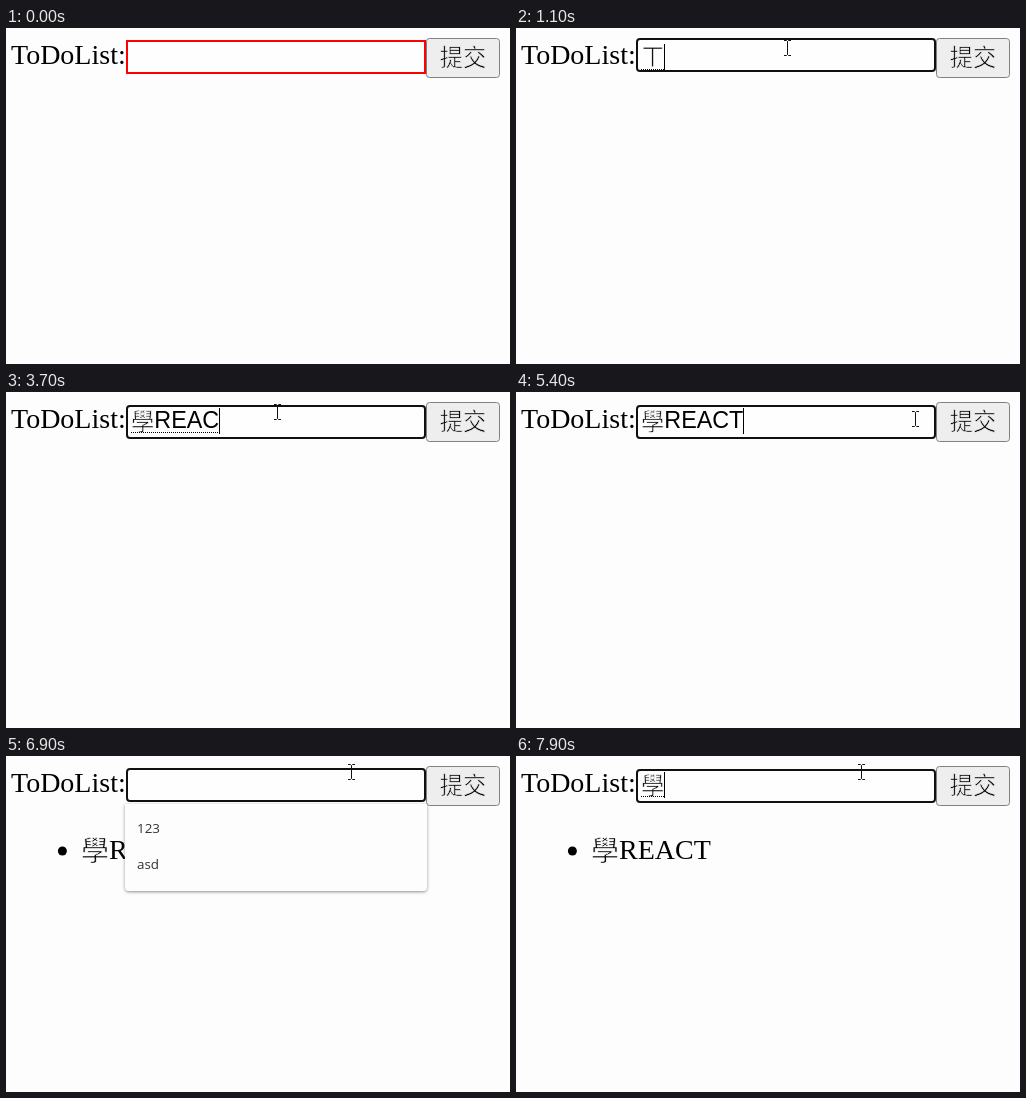
Recreate the animation shown at these times as an HTML page. Size 504x336 px, loop 8000 ms.

```html
<!DOCTYPE html>
<html lang="zh-Hant">
<head>
<meta charset="utf-8">
<title>ToDoList</title>
<style>
html, body { margin: 0; width: 100%; height: 100%; overflow: hidden; background: #fdfdfd; }
svg { display: block; }
text { fill: #000; white-space: pre; }
.page { font: 28px "Liberation Serif", "Times New Roman", serif; }
.form { font: 23.333px "Liberation Sans", Arial, sans-serif; }
/* a stroke in the ground colour thins the glyphs */
.han { font-family: "Noto Sans CJK TC", "Noto Sans CJK", sans-serif; font-weight: 300; stroke: #fdfdfd; stroke-width: .7; }
.hint { font: 13.4px "Open Sans", sans-serif; fill: #333; }
</style>
</head>
<body>
<svg width="504" height="336" viewBox="0 0 504 336">
  <defs>
    <filter id="shade" x="-5%" y="-10%" width="110%" height="125%">
      <feDropShadow dx="0" dy="1" stdDeviation="1.5" flood-color="#505060" flood-opacity=".65"/>
    </filter>
  </defs>
  <rect width="504" height="336" fill="#fdfdfd"/>
  <text class="page" x="5" y="36">ToDoList:</text>

  <g id="item">
    <circle cx="56.4" cy="95" r="4.5"/>
    <text class="page han" x="75" y="104.5">學</text>
    <text class="page" x="103" y="103">REACT</text>
  </g>

  <rect id="field" x="121" width="298" height="32" fill="#fefefe" stroke-width="2"/>
  <text id="head" class="form han" x="125"></text>
  <text id="tail" class="form" x="148.3" y="36"></text>
  <line id="under" x1="125" stroke="#000" stroke-dasharray="1 1"/>
  <rect id="caret" width="1" height="26" shape-rendering="crispEdges"/>

  <rect id="button" x="420.5" y="10.5" width="73" height="39" rx="3"/>
  <text id="label" class="form han" x="433.7" y="37.5">提交</text>

  <g id="menu">
    <path d="M119 48H421V131a4 4 0 0 1 -4 4H123a4 4 0 0 1 -4 -4Z" fill="#fdfdfd" filter="url(#shade)"/>
    <text class="hint" x="131" y="77">123</text>
    <text class="hint" x="131" y="113">asd</text>
  </g>

  <path id="beam" d="M-3.5 -7.5H-1L0 -6.5L1 -7.5H3.5M0 -6.5V6.5M-3.5 7.5H-1L0 6.5L1 7.5H3.5" fill="none" stroke="#111"/>
  <path id="arrow" d="M.5 .5V16.5L4.2 13L6.8 18.8L9.2 17.7L6.7 12H11.8Z" fill="#fff" stroke="#111"/>
</svg>
<script>
const LOOP = 8000, STEP = 100;
const $ = id => document.getElementById(id);
const [item, field, head, tail, under, caret, button, label, menu, beam, arrow] =
  ["item", "field", "head", "tail", "under", "caret", "button", "label", "menu", "beam", "arrow"].map($);

// [time, bopomofo or han, latin]
const typing = [
  [0, "", ""], [1100, "ㄒ", ""], [1900, "ㄒㄩ", ""], [2000, "ㄒㄩㄝ", ""], [2200, "學", ""],
  [2600, "學", "R"], [2900, "學", "RE"], [3400, "學", "REA"], [3700, "學", "REAC"],
  [3900, "學", "REACT"], [5900, "", ""], [7300, "ㄒ", ""], [7500, "ㄒㄩ", ""],
  [7700, "ㄒㄩㄝ", ""], [7900, "學", ""]
];
// [time, x, y]
const track = [
  [100, 66, 2], [300, 150, 10], [600, 271, 20], [5000, 271, 20], [5400, 399, 27],
  [5600, 432, 44], [5800, 433, 37], [6000, 433, 37], [6300, 345, 16], [LOOP, 345, 16]
];
// caret blink restarts at each keystroke and at these times
const resets = [...typing.map(s => s[0]), 800, 5000, 6400];

const within = (t, a, b) => t >= a && t < b;
const show = (el, on) => el.setAttribute("visibility", on ? "visible" : "hidden");
const set = (el, attrs) => { for (const k in attrs) el.setAttribute(k, attrs[k]); };

function pointer(t) {
  const i = track.findIndex(p => t < p[0]);
  if (i < 1) return null;
  const [t0, x0, y0] = track[i - 1], [t1, x1, y1] = track[i];
  const k = (t - t0) / (t1 - t0), e = k * k * (3 - 2 * k);
  return [Math.round(x0 + (x1 - x0) * e), Math.round(y0 + (y1 - y0) * e)];
}

function drawField(t) {
  const [, han, latin] = typing.filter(s => s[0] <= t).pop();
  const focus = within(t, 800, 5800) || t >= 6400;
  const top = !han ? 12 : han === "學" ? 13 : 10;
  set(field, { y: top + 1, rx: focus ? 3 : 0, stroke: focus ? "#101010" : "#f00" });

  head.textContent = han;
  tail.textContent = latin;
  set(head, { y: top === 10 ? 36.5 : 37.5 });
  let end = 125;
  if (han) end += head.getComputedTextLength();
  if (latin) end += tail.getComputedTextLength();

  const line = top === 10 ? 41.5 : 40.5;
  set(under, { x2: Math.round(end), y1: line, y2: line });
  show(under, han && !within(t, 5000, 5900));

  const since = t - Math.max(...resets.filter(r => r <= t));
  set(caret, { x: Math.floor(end), y: 16 });
  show(caret, focus && since % 1000 < 500);
}

function drawPointer(t) {
  const p = pointer(t);
  let text = false;
  if (p) {
    const [x, y] = p;
    text = x < 420 && x > 119 && y > 9 && y < 47;
    set(beam, { transform: `translate(${x + .5} ${y})` });
    set(arrow, { transform: `translate(${x} ${y})` });
  }
  show(beam, p && text);
  show(arrow, p && !text);
  const hover = p && p[0] >= 420 && p[1] < 50;
  const fill = hover ? "#e4e4e4" : "#eeeeef";
  set(button, { fill, stroke: hover ? "#555" : "#808080" });
  label.style.stroke = fill;
}

function render(t) {
  drawField(t);
  drawPointer(t);
  show(item, t >= 5900);
  show(menu, within(t, 800, 1100) || within(t, 6400, 7300));
}

const start = performance.now();
function tick(now) {
  const t = Math.max(0, now - start) % LOOP;
  render(Math.floor(t / STEP) * STEP);
  requestAnimationFrame(tick);
}
render(0);
requestAnimationFrame(tick);
</script>
</body>
</html>
```
